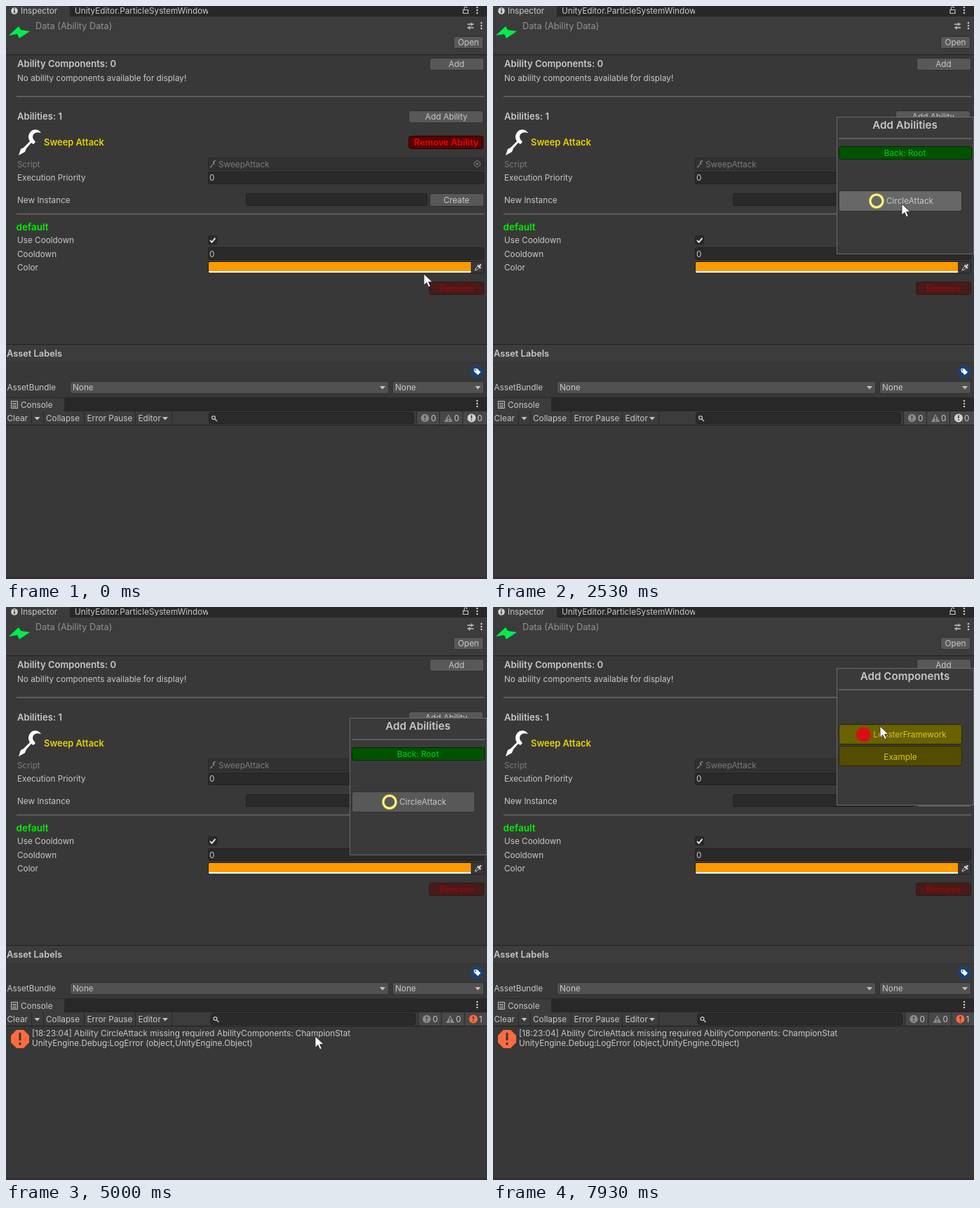
These frames come from a looping animation (686x817 px, 8000 ms). An HTML page:

```html
<!DOCTYPE html>
<html lang="en">
<head>
<meta charset="utf-8">
<title>Ability inspector</title>
<style>
html, body { margin: 0; width: 100%; height: 100%; overflow: hidden; background: #383838; }
svg { display: block; }
text { font: 11.76px Inter, sans-serif; fill: #c8c8c8; }
.b { font-weight: 600; font-size: 13.1px; }
.mid { text-anchor: middle; }
.dim { fill: #7c7c7c; }
.dark { fill: #282828; }
.bar { fill: #3c3c3c; }
.rule { fill: #5e5e5e; }
.edge { fill: #1f1f1f; }
.btn { fill: #585858; stroke: #303030; }
.field { fill: #2a2a2a; stroke: #212121; }
.drop { fill: #515151; stroke: #303030; }
.arrow { fill: #c4c4c4; }
.field.on, .swatch.on { stroke: #656565; }
.swatch { fill: none; stroke: #202020; }
.btn.on { fill: #676767; }
.btn.down { fill: #353535; }
.gold { fill: #544d00; stroke: #2b2700; }
.gold.on { fill: #6a6100; }
.goldText { fill: #d3c72e; }
.line { fill: none; stroke: #c4c4c4; }
</style>
</head>
<body>
<svg width="686" height="817" viewBox="0 0 686 817">
  <defs>
    <path id="tri" class="arrow" d="M-4-2h8l-4 4.5z"/>
    <g id="dots" fill="#c4c4c4"><circle cy="-4" r="1.3"/><circle r="1.3"/><circle cy="4" r="1.3"/></g>
    <path id="blade" d="M50 181C46 174 34 174 32 186C32 189 33 191 34 193L25 202L21 204L18 213L27 208L29 203L36 195L39 197L42 194L39 190C36 184 41 178 50 181Z"/>
  </defs>

  <!-- Inspector header -->
  <rect class="dark" width="686" height="15"/>
  <rect class="bar" width="91" height="16"/>
  <rect class="bar" y="15" width="686" height="54"/>
  <rect class="edge" y="69" width="686" height="1"/>
  <circle cx="12" cy="7" r="4.8" fill="#d0d0d0"/>
  <path d="M12 6v4M12 3.6v1.4" stroke="#333" stroke-width="1.6"/>
  <text x="21" y="11">Inspector</text>
  <text x="98" y="11">UnityEditor.ParticleSystemWindow</text>
  <rect class="dark" x="288" width="50" height="15"/>
  <path class="line" d="M652 5.5h7v5h-7zM653.5 5V3a2 2 0 0 1 4 0" stroke-width="1.2"/>
  <use href="#dots" x="672" y="6"/>
  <path d="M4 42L18 29L21 34L34 36L19 46L16 40Z" fill="#00ee4c"/>
  <text x="42" y="33" style="font-size:12.74px;fill:#929292">Data (Ability Data)</text>
  <path class="line" d="M658 26h9M658 31h9M664 23.5v5M661 28.5v5" stroke-width="1.3"/>
  <use href="#dots" x="678" y="28"/>
  <rect class="btn" x="638.5" y="43.5" width="42" height="17" rx="3"/>
  <text class="mid" x="659.5" y="56">Open</text>

  <!-- Ability lists -->
  <text class="b" x="16" y="87">Ability Components: 0</text>
  <rect id="add" class="btn" x="604.5" y="74.5" width="77" height="17" rx="3"/>
  <text class="mid" x="642.5" y="87">Add</text>
  <text x="16" y="107">No ability components available for display!</text>
  <rect class="rule" x="15" y="128" width="667" height="2"/>
  <text class="b" x="16" y="162">Abilities: 1</text>
  <rect id="addAbility" class="btn" x="574.5" y="149.5" width="106" height="17" rx="3"/>
  <text class="mid" x="628" y="162">Add Ability</text>
  <use href="#blade" fill="#fff"/>
  <text class="b" x="54" y="199" style="font-size:12.9px;fill:#e6d200">Sweep Attack</text>
  <rect x="574.5" y="185.5" width="106" height="18" rx="3" fill="#560303" stroke="#260303"/>
  <text class="b mid" x="628" y="199" style="font-size:12.7px;fill:#f40000">Remove Ability</text>

  <text class="dim" x="16" y="230">Script</text>
  <rect x="288.5" y="216.5" width="393" height="17" rx="2" fill="#313131" stroke="#292929"/>
  <use href="#blade" fill="#8a8a8a" transform="translate(286 171) scale(.28)"/>
  <text class="dim" x="303" y="230">SweepAttack</text>
  <circle class="line" cx="672" cy="225" r="4.2" style="stroke:#808080"/>
  <circle cx="672" cy="225" r="1.6" fill="#808080"/>
  <text x="16" y="249">Execution Priority</text>
  <rect class="field hov" x="288.5" y="236.5" width="393" height="17" rx="2"/>
  <text x="290" y="249">0</text>
  <text x="16" y="281">New Instance</text>
  <rect class="field" x="342.5" y="267.5" width="258" height="17" rx="2"/>
  <rect class="btn" x="604.5" y="267.5" width="77" height="18" rx="3"/>
  <text class="mid" x="642.5" y="281">Create</text>
  <rect class="rule" x="15" y="295.5" width="667" height="2"/>

  <text class="b" x="14.5" y="319.5" style="font-size:13.5px;fill:#00f000">default</text>
  <text x="16" y="338">Use Cooldown</text>
  <rect class="field" x="288.5" y="327.5" width="12" height="12" rx="2"/>
  <path d="M291 334l2.5 2.8l5-6" fill="none" stroke="#f0f0f0" stroke-width="1.8"/>
  <text x="16" y="357.5">Cooldown</text>
  <rect class="field hov" x="288.5" y="344.5" width="393" height="17" rx="2"/>
  <text x="290" y="357.5">0</text>
  <text x="16" y="377">Color</text>
  <rect x="289" y="365" width="374" height="13" fill="#ff9a00"/>
  <rect x="289" y="378" width="374" height="2.5" fill="#fff"/>
  <rect class="swatch hov" x="288.5" y="364.5" width="393" height="16.5" rx="2"/>
  <path d="M669 377l1-3l4-4l2 2l-4 4z" class="line"/>
  <path d="M672.5 369.5l4.5 4.5M674.5 371.5l3-3" stroke="#d0d0d0" stroke-width="2.4"/>
  <rect x="603.5" y="393.5" width="78" height="18" rx="3" fill="#481a1a" stroke="#301818"/>
  <text class="b mid" x="642.5" y="407" style="font-size:12.7px;fill:#8b0d0d">Remove</text>

  <!-- Asset labels -->
  <rect class="bar" y="482" width="686" height="26"/>
  <rect class="edge" y="482" width="686" height="1"/>
  <rect y="508" width="686" height="1" fill="#303030"/>
  <text class="b" x="1" y="499.5" style="font-size:12.8px">Asset Labels</text>
  <rect x="663" y="513" width="18" height="17" rx="8" fill="#17427a"/>
  <path d="M667.5 517h4.5l5 5l-4 4l-5.5-5z" fill="#fff"/>
  <circle cx="669.5" cy="519" r="1" fill="#17427a"/>
  <text x="1.5" y="548">AssetBundle</text>
  <rect class="drop" x="91.5" y="535.5" width="454" height="17" rx="3"/>
  <text x="95" y="548">None</text>
  <use href="#tri" x="537" y="544"/>
  <rect class="drop" x="551.5" y="535.5" width="130" height="17" rx="3"/>
  <text x="555" y="548">None</text>
  <use href="#tri" x="673" y="544"/>

  <!-- Console -->
  <rect class="dark" y="558" width="686" height="20"/>
  <rect class="bar" y="559" width="83" height="20"/>
  <rect class="bar" y="578" width="686" height="19"/>
  <rect class="edge" y="597" width="686" height="1"/>
  <path class="line" d="M7.5 563.5h9v10h-9zM9 566.5h6M9 569h6M9 571.5h6"/>
  <text x="21" y="573">Console</text>
  <use href="#dots" x="672" y="567"/>
  <text x="1.5" y="592">Clear</text>
  <use href="#tri" x="44.5" y="588"/>
  <text x="57" y="592">Collapse</text>
  <text x="115.5" y="592">Error Pause</text>
  <text x="188.5" y="592">Editor</text>
  <use href="#tri" x="227" y="588"/>
  <path d="M36.5 578v19M53.5 578v19M111.5 578v19M184.5 578v19M236.5 578v19" stroke="#282828"/>
  <g id="counters">
    <rect class="field" x="289.5" y="579.5" width="292" height="16" rx="3"/>
    <circle class="line" cx="296" cy="587" r="2.4" stroke-width="1.3"/>
    <path class="line" d="M298 589l3 3" stroke-width="1.5"/>
    <rect x="586" y="578" width="100" height="19" fill="#484848"/>
    <path d="M585.5 578v19M618.5 578v19M651.5 578v19" stroke="#282828"/>
    <circle cx="597.5" cy="587.5" r="5.8" fill="#8a8a8a"/>
    <path d="M631 582l6 11h-12z" fill="#8a8a8a"/>
    <path d="M597.5 584v4M597.5 589.5v1.5M631 585.5v3.5M631 590.5v1.5" stroke="#333" stroke-width="1.5"/>
    <text x="606" y="592">0</text>
    <text x="639" y="592">0</text>
    <circle id="errorIcon" cx="664" cy="587.5" r="6"/>
    <path d="M664 583.5v4.5M664 589.5v1.5" stroke="#333" stroke-width="1.6"/>
    <text id="errorCount" x="672" y="592">0</text>
  </g>
  <g id="log">
    <path d="M15 603h10l8 8v10l-8 8h-10l-8-8v-10z" fill="#ff6b40"/>
    <path d="M20 607v11M20 621v3.5" stroke="#383838" stroke-width="3"/>
    <text x="37" y="612">[18:23:04] Ability CircleAttack missing required AbilityComponents: ChampionStat</text>
    <text x="37" y="626">UnityEngine.Debug:LogError (object,UnityEngine.Object)</text>
  </g>
  <rect y="814" width="686" height="3" fill="#332f30"/>

  <g id="popup">
    <rect x="490.5" y="158.5" width="195" height="195" fill="#3a3a3a" stroke="#6a6a6a"/>
    <text id="title" class="b mid" x="587.5" y="174.5" style="font-size:15.2px"></text>
    <rect class="rule" x="493" y="188" width="190" height="2"/>
    <g id="root">
      <rect class="gold hov" x="493.5" y="238.5" width="175" height="28" rx="3"/>
      <circle cx="528.5" cy="253" r="10.5" fill="#d80f12"/>
      <text class="goldText" x="542.5" y="257">LobsterFramework</text>
      <rect class="gold hov" x="493.5" y="269.5" width="175" height="28" rx="3"/>
      <text class="goldText mid" x="581" y="288.5">Example</text>
    </g>
    <g id="example">
      <rect x="493.5" y="200.5" width="189" height="18" rx="3" fill="#005200" stroke="#002a00"/>
      <text class="mid" x="587.5" y="213.5" style="fill:#08cc20">Back: Root</text>
      <rect id="circle" class="btn hov" x="493.5" y="263.5" width="175" height="29" rx="3"/>
      <circle cx="547" cy="278" r="9" fill="none" stroke="#e8d832" stroke-width="3.6"/>
      <circle cx="547" cy="278" r="9" fill="none" stroke="#fffbc4" stroke-width="1.6"/>
      <text x="561" y="282">CircleAttack</text>
    </g>
  </g>
  <path id="cursor" d="M0 0V16L4 12.5L6.7 18.7L9.3 17.5L6.6 11.5H12Z" fill="#fff" stroke="#222" stroke-width=".8"/>
</svg>
<script>
const STEPS = 120, LOOP = 8000;
// Pointer path: step, x, y
const path = [
  [0, 596, 382], [3, 596, 382], [4, 597, 376], [6, 597, 376], [9, 600, 345], [14, 611, 190], [17, 612, 155],
  [28, 612, 155], [29, 611, 164], [32, 600, 225], [35, 584, 278], [36, 583, 282], [39, 583, 282],
  [40, 582, 283], [43, 582, 283], [47, 576, 280], [62, 576, 280], [63, 576, 310], [67, 545, 400],
  [71, 470, 570], [74, 443, 616], [75, 441, 612], [76, 440, 608], [81, 440, 608], [85, 340, 400],
  [87, 261, 230], [89, 310, 166], [91, 375, 135], [93, 467, 112], [94, 467, 112], [99, 610, 71],
  [101, 666, 82], [102, 648, 92], [106, 648, 92], [107, 647, 92], [108, 647, 92], [110, 640, 88],
  [113, 640, 88], [119, 552, 170]
];
const $ = id => document.getElementById(id);
const show = (id, on) => $(id).style.display = on ? '' : 'none';
const hovers = [...document.querySelectorAll('.hov')].map(el => ({
  el,
  inPopup: $('popup').contains(el),
  box: ['x', 'y', 'width', 'height'].map(name => +el.getAttribute(name))
}));
const inside = (px, py, [x, y, w, h]) => px >= x && px <= x + w && py >= y && py <= y + h;

function pointer(step) {
  const i = path.findIndex(p => p[0] >= step);
  const [k1, x1, y1] = path[i], [k0, x0, y0] = path[Math.max(0, i - 1)];
  const f = k1 > k0 ? (step - k0) / (k1 - k0) : 1;
  return [x0 + (x1 - x0) * f, y0 + (y1 - y0) * f];
}

function draw(time) {
  const step = Math.floor((time % LOOP + 4) * STEPS / LOOP) % STEPS;
  const [x, y] = pointer(step);
  const components = step >= 113;
  const open = components || step >= 21 && step < 90;
  const example = step >= 38 && step < 90;
  const failed = step >= 52;
  const shift = components ? -71 : 0;

  $('cursor').setAttribute('transform', `translate(${x} ${y})`);
  show('popup', open);
  show('root', !example);
  show('example', example);
  $('popup').setAttribute('transform', `translate(0 ${shift})`);
  $('title').textContent = components ? 'Add Components' : 'Add Abilities';

  const overPopup = open && inside(x, y - shift, [490, 158, 196, 196]);
  for (const { el, inPopup, box } of hovers)
    el.classList.toggle('on', inPopup === overPopup && inside(x, inPopup ? y - shift : y, box));
  $('addAbility').classList.toggle('down', step === 19 || step === 20);
  $('add').classList.toggle('down', step === 112);
  $('circle').classList.toggle('down', step === 50 || step === 51);

  show('log', failed);
  $('counters').setAttribute('transform', `translate(${failed ? 2.5 : 0} 0)`);
  $('errorIcon').setAttribute('fill', failed ? '#ff6b40' : '#d2d2d2');
  $('errorCount').textContent = failed ? 1 : 0;
}

const start = performance.now();
(function frame() {
  draw(performance.now() - start);
  requestAnimationFrame(frame);
})();
</script>
</body>
</html>
```
